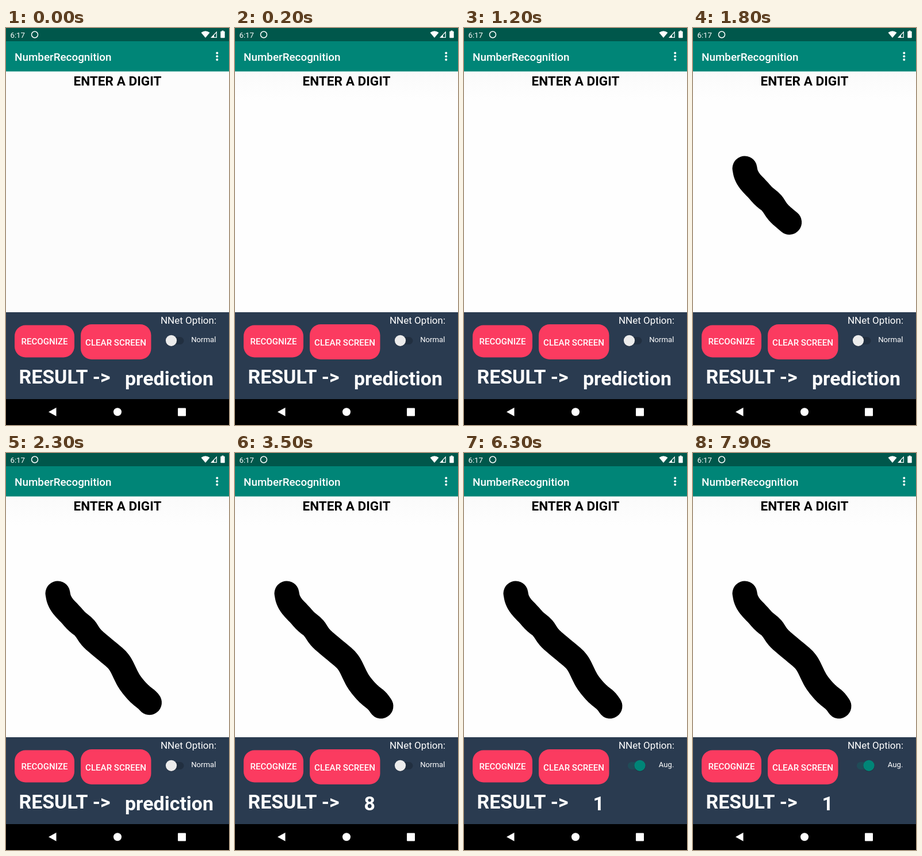
An HTML page with a canvas for the animation above (8000 ms loop, 388 by 690 pixels).

```html
<!DOCTYPE html>
<html lang="en">
<head>
<meta charset="utf-8">
<title>Digit recognition</title>
<style>
html, body { margin: 0; width: 100%; height: 100%; overflow: hidden; background: #000; }
canvas { display: block; width: 388px; height: 690px; }
</style>
</head>
<body>
<canvas id="stage" width="388" height="690"></canvas>
<script>
const W = 388, H = 690, LOOP = 8000, STEP = 100;
const DRAW = [1500, 2400], FIRST = 3300, TOGGLE = 4790, SECOND = 5700;
const canvas = document.getElementById('stage');
const ctx = canvas.getContext('2d');
const dpr = window.devicePixelRatio || 1;
canvas.width = W * dpr;
canvas.height = H * dpr;

const clamp = x => Math.max(0, Math.min(1, x));
const mix = (a, b, k) => a + (b - a) * k;
const rgb = (a, b, k) => `rgb(${a.map((v, i) => Math.round(mix(v, b[i], k))).join()})`;

function rect(x, y, w, h, color) {
  ctx.fillStyle = color;
  ctx.fillRect(x, y, w, h);
}

function roundRect(x, y, w, h, r, color) {
  ctx.fillStyle = color;
  ctx.beginPath();
  ctx.roundRect(x, y, w, h, r);
  ctx.fill();
}

function disc(x, y, r, color) {
  ctx.fillStyle = color;
  ctx.beginPath();
  ctx.arc(x, y, r, 0, Math.PI * 2);
  ctx.fill();
}

function poly(points, color) {
  ctx.fillStyle = color;
  ctx.beginPath();
  points.forEach(p => ctx.lineTo(...p));
  ctx.fill();
}

function text(s, x, y, size, weight = 400, align = 'left', color = '#fff') {
  ctx.font = `${weight} ${size}px Roboto, sans-serif`;
  ctx.textAlign = align;
  ctx.fillStyle = color;
  ctx.fillText(s, x, y);
}

// Finger trail, smoothed with quadratic curves through the midpoints.
const touches = [[90, 244], [92, 255], [99, 267], [111, 279], [124, 294], [137, 303],
  [147, 320], [162, 333], [179, 347], [197, 362], [207, 383], [215, 399],
  [232, 419], [247, 430], [254, 440]];

function smooth(pts) {
  const out = [pts[0]];
  const mid = (a, b) => [(a[0] + b[0]) / 2, (a[1] + b[1]) / 2];
  for (let i = 1; i < pts.length - 1; i++) {
    const a = mid(pts[i - 1], pts[i]), c = mid(pts[i], pts[i + 1]);
    for (let k = 0; k <= 1; k += 0.25) {
      const at = j => mix(mix(a[j], pts[i][j], k), mix(pts[i][j], c[j], k), k);
      out.push([at(0), at(1)]);
    }
  }
  out.push(pts[pts.length - 1]);
  return out;
}

const trail = smooth(touches);
const dist = (a, b) => Math.hypot(b[0] - a[0], b[1] - a[1]);
const trailLength = trail.reduce((sum, p, i) => i ? sum + dist(trail[i - 1], p) : 0, 0);

function drawTrail(part) {
  let left = trailLength * part;
  ctx.strokeStyle = '#000';
  ctx.lineWidth = 43;
  ctx.lineCap = ctx.lineJoin = 'round';
  ctx.beginPath();
  ctx.moveTo(...trail[0]);
  for (let i = 1; i < trail.length && left > 0; i++) {
    const a = trail[i - 1], b = trail[i], d = dist(a, b);
    if (!d) continue;
    const k = Math.min(1, left / d);
    ctx.lineTo(mix(a[0], b[0], k), mix(a[1], b[1], k));
    left -= d;
  }
  ctx.stroke();
}

function drawStatusBar() {
  rect(0, 0, W, 23, '#00574b');
  text('6:17', 7.5, 16.5, 13.2);
  ctx.strokeStyle = '#fff';
  ctx.lineWidth = 1.5;
  ctx.beginPath();
  ctx.arc(50, 11.5, 5.5, 0, Math.PI * 2);
  ctx.stroke();

  // Wi-Fi, signal and battery
  ctx.fillStyle = '#fff';
  ctx.beginPath();
  ctx.moveTo(347, 17);
  ctx.lineTo(339.5, 8);
  ctx.quadraticCurveTo(347, 2.5, 354.5, 8);
  ctx.fill();
  ctx.lineWidth = 1.2;
  ctx.lineCap = 'butt';
  ctx.lineJoin = 'miter';
  ctx.beginPath();
  ctx.moveTo(357.5, 16.3);
  ctx.lineTo(366.3, 16.3);
  ctx.lineTo(366.3, 7);
  ctx.closePath();
  ctx.stroke();
  poly([[356.5, 17], [362, 17], [362, 11.5]], '#fff');
  rect(375.5, 4.5, 3, 2, '#fff');
  roundRect(373.3, 5.8, 7.4, 11.4, 0.8, '#fff');
}

function drawAppBar() {
  rect(0, 23, W, 52.5, '#008577');
  text('NumberRecognition', 15, 56.5, 18.87, 500);
  [43.5, 49.2, 55].forEach(y => disc(367.3, y, 2, '#fff'));
}

function drawPaper(t) {
  rect(0, 75, W, 420, t < 100 ? '#fcfcfc' : '#fefefe');
  if (t >= 100) {
    const g = ctx.createLinearGradient(0, 75, 0, 125);
    g.addColorStop(0, '#fafafa');
    g.addColorStop(1, '#fefefe');
    rect(0, 75, W, 50, g);
  }
  text('ENTER A DIGIT', 194, 99.5, 22.63, 700, 'center', '#000');
  if (t >= DRAW[0]) {
    const u = clamp((t - DRAW[0]) / (DRAW[1] - DRAW[0]));
    drawTrail(1 - Math.pow(1 - u, 1.6));
  }
}

function drawSwitch(t) {
  const u = clamp((t - TOGGLE) / 250);
  const k = (1 - Math.cos(u * Math.PI)) / 2;
  const on = t >= TOGGLE;
  roundRect(285, 537, 24.5, 13, 6.5, on ? 'rgba(0,133,119,.24)' : 'rgba(0,0,0,.2)');
  disc(mix(287.5, 306, k), 544, 10, 'rgba(0,0,0,.15)');
  disc(mix(287.5, 306, k), 543.3, 9.6, rgb([236, 236, 236], [0, 133, 119], k));
  text(on ? 'Aug.' : 'Normal', 365.5, 546.3, 13.2, 400, 'right');
}

function drawPanel(t) {
  rect(0, 494, W, 151, '#2a3b50');
  roundRect(15, 516.5, 104, 56, 19, '#fb3b60');
  roundRect(130, 515, 122.5, 61, 19, '#fb3b60');
  text('RECOGNIZE', 67, 550.3, 15.09, 500, 'center');
  text('CLEAR SCREEN', 191, 551.5, 15.09, 500, 'center');
  text('NNet Option:', 366, 514, 16.98, 400, 'right');
  drawSwitch(t);
  text('RESULT ->', 22.5, 618.3, 33.95, 700);
  if (t < FIRST) text('prediction', 207, 620.8, 33.95, 700);
  else text(t < SECOND ? '8' : '1', 234.3, 620.8, 33.95, 700, 'center');
}

function drawNav() {
  rect(0, 645, W, 45, '#000');
  poly([[74, 667.3], [87.5, 659.8], [87.5, 674.8]], '#fff');
  disc(194, 667.3, 7, '#fff');
  roundRect(299, 660.5, 14, 14, 1, '#fff');
}

function frame(now) {
  const t = Math.floor((now % LOOP) / STEP) * STEP;
  ctx.setTransform(dpr, 0, 0, dpr, 0, 0);
  drawPaper(t);
  drawStatusBar();
  drawAppBar();
  drawPanel(t);
  drawNav();
}

let start;
function tick(now) {
  if (start === undefined) start = now;
  frame(Math.max(0, now - start));
  requestAnimationFrame(tick);
}
frame(0);
requestAnimationFrame(tick);
</script>
</body>
</html>
```
